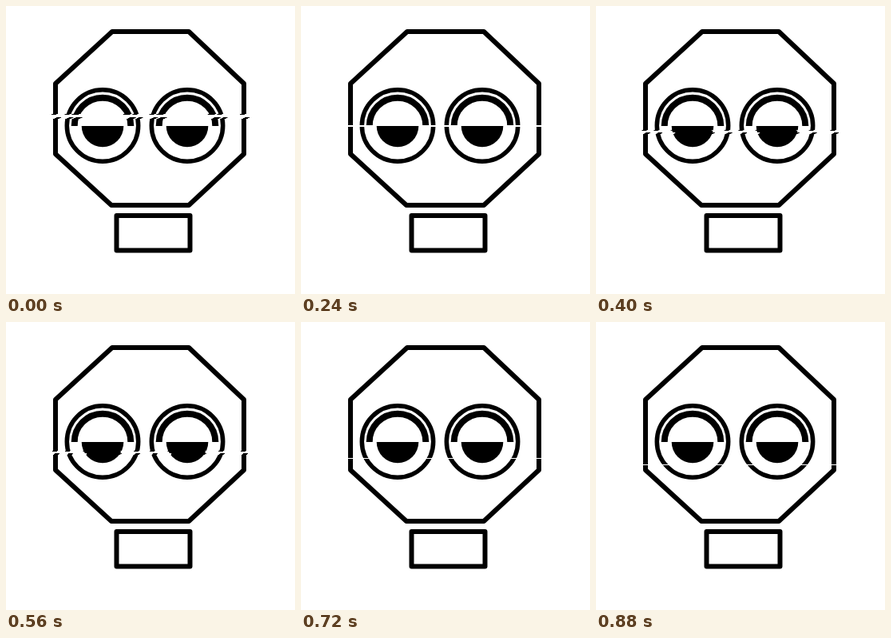
An HTML page with a canvas that plays this animation: 362x360 px, repeating every 960 ms.

```html
<!DOCTYPE html>
<html lang="en">
<head>
<meta charset="utf-8">
<title>Sleepy face</title>
<style>
html, body { margin: 0; width: 100%; height: 100%; overflow: hidden; background: #fff; }
canvas { display: block; }
</style>
</head>
<body>
<canvas id="stage" width="362" height="360"></canvas>
<script>
const W = 362, H = 360, STEP = 80, LAST = 11;
const EYES = [121, 227];
const ctx = document.getElementById('stage').getContext('2d');

function layer(paint) {
  const c = document.createElement('canvas');
  c.width = W;
  c.height = H;
  paint(c.getContext('2d'));
  return c;
}

function arc(g, x, y, r, from, to) {
  g.beginPath();
  g.arc(x, y, r, from, to);
}

const lines = layer(g => {
  g.lineJoin = 'round';
  g.lineWidth = 6;
  g.beginPath();
  [[133, 32], [229, 32], [298, 97], [298, 185], [229, 249], [132, 249], [62, 185], [62, 97]]
    .forEach(([x, y]) => g.lineTo(x, y));
  g.closePath();
  g.stroke();
  g.strokeRect(138.5, 262, 92, 43.5);
  for (const x of EYES) {
    g.lineWidth = 5.5;
    arc(g, x, 149.5, 44.7, 0, Math.PI * 2);
    g.stroke();
    g.lineWidth = 8;
    arc(g, x, 150, 35.3, Math.PI, 0);
    g.stroke();
  }
});

const irises = layer(g => {
  for (const x of EYES) {
    arc(g, x, 150, 26.3, 0, Math.PI);
    g.fill();
  }
});

function slice(img, y, h, dx = 0) {
  ctx.drawImage(img, 0, y, W, h, dx, y, W, h);
}

// Rows next to the scan line are pulled sideways
function tear(img, y, gap, pull) {
  const low = y + gap;
  slice(img, 0, y - 1);
  slice(img, y - 1, 1, -pull / 2);
  slice(img, low, 1, pull);
  slice(img, low + 1, 1, pull / 2);
  slice(img, low + 2, H - low - 2);
}

function draw(step) {
  const t = step / LAST;
  const y = Math.round(136 + 42.4 * t + 1.3 * Math.sin(2 * Math.PI * t));
  const gap = Math.round(3 - 2 * t);
  const pull = Math.round(4 * Math.abs(Math.cos(step * Math.PI / 6)) * (1 - t * t));
  ctx.fillStyle = '#fff';
  ctx.fillRect(0, 0, W, H);
  tear(lines, y, gap, pull);
  tear(irises, y, gap, pull);
  slice(irises, y, gap);
}

function tick(now) {
  draw(Math.floor(now / STEP) % (LAST + 1));
  requestAnimationFrame(tick);
}

draw(0);
requestAnimationFrame(tick);
</script>
</body>
</html>
```
